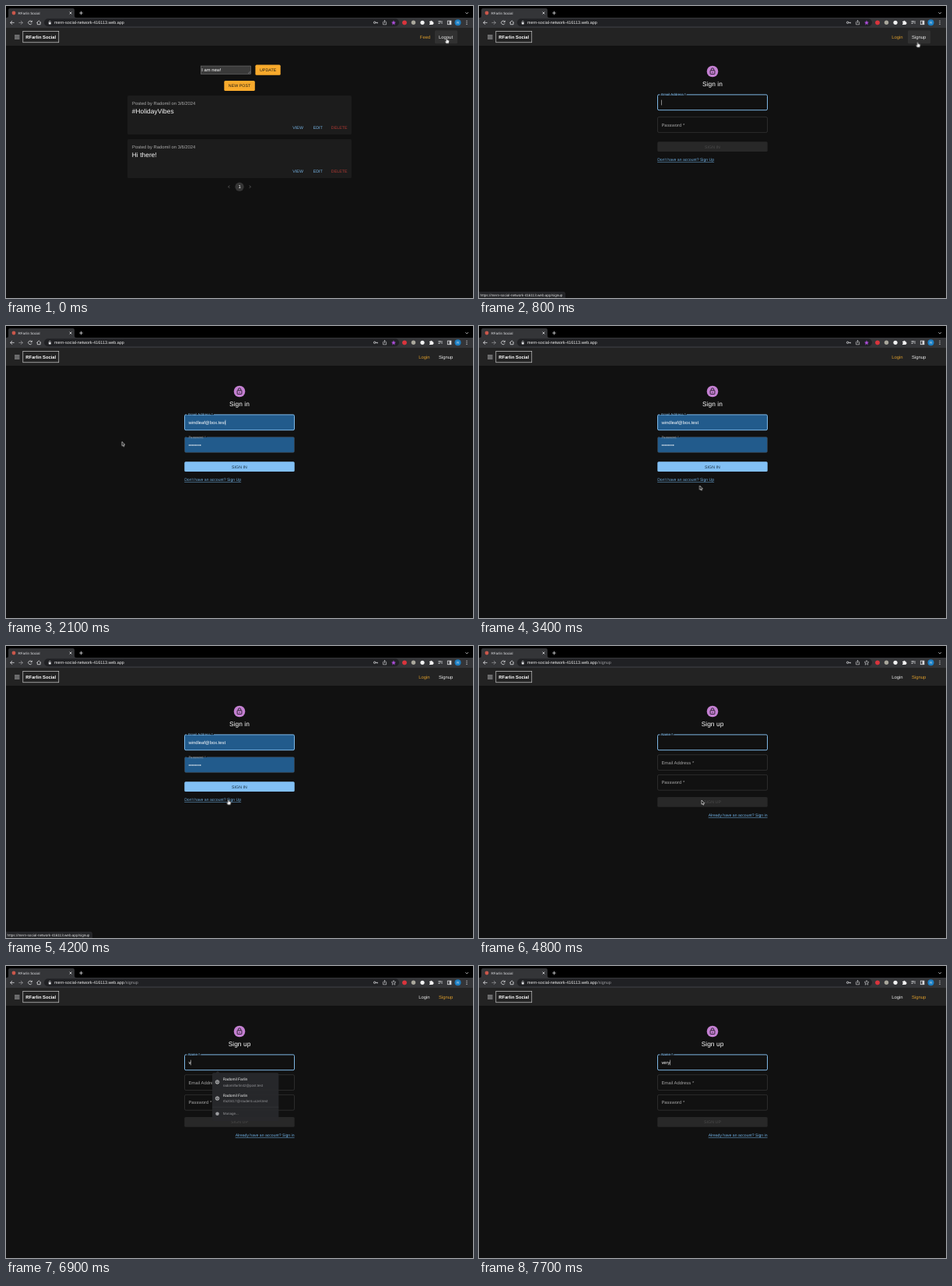
Recreate the animation shown at these times as an HTML page. Size 600 by 375 pixels, loop 8000 ms.

```html
<!DOCTYPE html>
<html lang="en">
<head>
<meta charset="utf-8">
<title>RFarlin Social</title>
<style>
html, body { margin: 0; width: 100%; height: 100%; overflow: hidden; background: #111; }
svg { display: block; width: 100vw; height: 100vh; }
text { font: 5.83px "Liberation Sans", Arial, sans-serif; fill: #fff; text-rendering: geometricPrecision; white-space: pre; }
.mid { text-anchor: middle; }
.end { text-anchor: end; }
.line { fill: none; stroke: #dcdde0; stroke-width: .8; }
.tab { font-size: 4.5px; fill: #e4e5e8; }
.url { font-size: 5.4px; fill: #eee; }
.dim { fill: #9a9b9e; }
.nav { font-size: 5.9px; fill: #e8e8e8; }
.now { fill: #d99a2b; }
.brand { font-weight: bold; }
.h { font-size: 8.33px; letter-spacing: .06px; }
.btn { font-size: 5.25px; letter-spacing: .05px; }
.dark { fill: #1d1a14; }
.off { fill: #4b4b4b; }
.by { fill: #a9a9a9; }
.view { fill: #79b8ea; }
.del { fill: #b53a34; }
.link { font-size: 5.1px; fill: #70b1e4; text-decoration: underline; }
.label { fill: #a6a6a6; letter-spacing: .05px; }
.small { font-size: 4.37px; }
.focus { fill: #7fbdee; }
.box { fill: none; stroke: #474747; stroke-width: .5; }
.active { stroke: #84c0f0; stroke-width: .95; }
.who { font-size: 4.9px; }
.mail { font-size: 4.53px; fill: #9b9ca0; }

.cut { animation: 8s step-end infinite; }
.fade { animation: 8s linear infinite; }
.home { animation-name: home; }
.login { animation-name: login; }
.signup { animation-name: signup; }
.root { animation-name: root; }
.hover { animation-name: hover; }
.status { animation-name: status; }
.fill { animation-name: fill; }
.empty { animation-name: empty; }
.float { animation-name: float; }
.popup { animation-name: popup; }
.blink { animation: blink 1s step-end infinite; }
.b1 { animation-delay: -.36s; }
.b2 { animation-delay: -.71s; }
.before { animation-name: before; }
.after { animation-name: after; }
.caret { animation-name: caret; }
.k1 { animation-name: after; }
.k2 { animation-name: k2; }
.k3 { animation-name: k3; }
.k4 { animation-name: k4; }
.move { animation-name: move; }
.hand { animation-name: hand; }
.arrow { animation-name: arrow; }
.beam { animation-name: beam; }

@keyframes home { 0% { opacity: 1 } 7.5%, 100% { opacity: 0 } }
@keyframes login { 0% { opacity: 0 } 7.5% { opacity: 1 } 53.625%, 100% { opacity: 0 } }
@keyframes signup { 0% { opacity: 0 } 53.625%, 100% { opacity: 1 } }
@keyframes root { 0% { opacity: 1 } 53.625%, 100% { opacity: 0 } }
@keyframes hover { 0%, 12.8% { opacity: 1 } 15.6%, 100% { opacity: 0 } }
@keyframes status {
  0%, 7.8% { opacity: 0 } 8.8%, 13.5% { opacity: 1 } 15.5%, 46.2% { opacity: 0 }
  47.5%, 57.4% { opacity: 1 } 59.8%, 100% { opacity: 0 }
}
@keyframes fill { 0%, 12.5% { opacity: 0 } 13.5%, 100% { opacity: 1 } }
@keyframes empty { 0%, 12.5% { opacity: 1 } 13.5%, 100% { opacity: 0 } }
@keyframes float {
  0%, 12.5% { transform: translate(234.4px, 154.5px) }
  15%, 100% { transform: translate(234.2px, 144px) scale(.75) }
}
@keyframes popup { 0%, 71.8% { opacity: 0 } 73%, 86.2% { opacity: 1 } 87.4%, 100% { opacity: 0 } }
@keyframes blink { 0% { opacity: 1 } 50%, 100% { opacity: 0 } }
@keyframes before { 0% { opacity: 1 } 86.25%, 100% { opacity: 0 } }
@keyframes after { 0% { opacity: 0; fill-opacity: 0 } 86.25%, 100% { opacity: 1; fill-opacity: 1 } }
@keyframes k2 { 0% { fill-opacity: 0 } 91.2%, 100% { fill-opacity: 1 } }
@keyframes k3 { 0% { fill-opacity: 0 } 93.7%, 100% { fill-opacity: 1 } }
@keyframes k4 { 0% { fill-opacity: 0 } 96.2%, 100% { fill-opacity: 1 } }
@keyframes caret {
  0% { transform: translateX(2.9px) } 91.2% { transform: translateX(6.2px) }
  93.7% { transform: translateX(8.2px) } 96.2%, 100% { transform: translateX(11.1px) }
}
@keyframes move {
  0% { transform: translate(566px, 41.5px) }
  4% { transform: translate(565.6px, 42.5px) }
  10% { transform: translate(563.5px, 46.5px) }
  12.8% { transform: translate(560px, 50px) }
  17% { transform: translate(520px, 75px) }
  22.5% { transform: translate(410px, 112px) }
  26.25% { transform: translate(149px, 148.5px) }
  28.5% { transform: translate(141px, 153px) }
  33.75% { transform: translate(212px, 188px) }
  37.5% { transform: translate(268px, 216px) }
  42.5% { transform: translate(283.5px, 205px) }
  46.2% { transform: translate(285px, 198.5px) }
  53.6% { transform: translate(285.6px, 197.2px) }
  60%, 65% { transform: translate(286px, 198px) }
  67.5%, 70% { transform: translate(297px, 132px) }
  73.1%, 100% { transform: translate(298px, 128.3px) }
}
@keyframes hand { 0% { opacity: 1 } 12.8% { opacity: 0 } 45.2% { opacity: 1 } 53.625%, 100% { opacity: 0 } }
@keyframes arrow { 0% { opacity: 0 } 12.8% { opacity: 1 } 45.2% { opacity: 0 } 53.625% { opacity: 1 } 65.6%, 100% { opacity: 0 } }
@keyframes beam { 0% { opacity: 0 } 65.6% { opacity: 1 } 86.25%, 100% { opacity: 0 } }
</style>
</head>
<body>
<svg viewBox="0 0 600 375">
  <defs>
    <g id="card">
      <rect x="156" y="115" width="288" height="50" rx="1.5" fill="#1c1c1c"/>
      <text class="by" x="162" y="127">Posted by Radomil on 3/6/2024</text>
      <text class="btn view" x="368.3" y="157.6">VIEW</text>
      <text class="btn view" x="394.7" y="157.6">EDIT</text>
      <text class="btn del" x="417.8" y="157.6">DELETE</text>
    </g>
    <g id="badge">
      <circle cx="300" cy="84" r="7.3" fill="#c480d2"/>
      <g fill="none" stroke="#1b131d" stroke-width=".85">
        <rect x="297.1" y="82.7" width="5.8" height="4.8" rx=".5"/>
        <path d="M298.3 82.7V81.5a1.7 1.7 0 0 1 3.4 0V82.7"/>
      </g>
      <circle cx="300" cy="85.1" r=".7" fill="#1b131d"/>
    </g>
    <rect id="field" x="229.5" width="141" height="19.8" rx="1.6"/>
    <rect id="button" x="229.3" width="141.4" height="12.8" rx="1.6"/>
    <rect id="bar" x="234.4" y="120.6" width=".5" height="6.8" fill="#fff"/>
    <path id="star" d="M0-3 .8-.9 3-.8 1.3.6 1.9 2.7 0 1.5-1.9 2.7-1.3.6-3-.8-.8-.9Z"/>
    <g id="person" class="line" stroke-width=".5">
      <circle r="2.3"/><circle cy="-.6" r=".75"/><path d="M-1.5 1.6Q0 .2 1.5 1.6"/>
    </g>
  </defs>

  <!-- browser -->
  <rect width="600" height="375" fill="#111"/>
  <rect width="600" height="16" fill="#000"/>
  <path d="M1 15Q3 15 3 13V5Q3 3 5 3H86Q88 3 88 5V13Q88 15 90 15Z" fill="#343538"/>
  <rect y="15" width="600" height="13" fill="#343538"/>
  <rect x="49" y="16.3" width="456" height="10" rx="5" fill="#202124"/>
  <circle cx="10" cy="9" r="2.4" fill="#c9574b"/>
  <text class="tab" x="15.6" y="10.7">RFarlin Social</text>
  <g class="line">
    <path d="M81.6 7.6l2.8 2.8m0-2.8l-2.8 2.8M94.2 9h4.6M96.5 6.7v4.6M590.4 8.2l1.7 1.7 1.7-1.7"/>
    <path d="M10.6 21.4H5.7M8 19l-2.4 2.4L8 23.8"/>
    <path d="M16.4 21.4h4.9M19 19l2.4 2.4-2.4 2.4" opacity=".55"/>
    <path d="M32.9 20.1a2.3 2.3 0 1 0 .2 2.2M33.3 18.7v1.8h-1.8"/>
    <path d="M39.4 21.5l2.8-2.6 2.8 2.6M40.3 21v2.7h3.8V21"/>
    <path d="M55.3 21v-.8a1 1 0 0 1 2 0v.8" stroke-width=".6"/>
    <circle cx="473.6" cy="21.3" r="1.2"/><path d="M474.8 21.3h3M477 21.3v1.2"/>
    <path d="M485.3 20.6h-.9v3.2h4.2v-3.2h-.9M486.5 22.2v-3.8M485.3 19.6l1.2-1.2 1.2 1.2" stroke-width=".6"/>
    <path d="M555.5 19.5h3.4M555.5 21h3.4M555.5 22.5h2M560 19v4" stroke-width=".7"/>
    <rect x="567.3" y="19.1" width="4.6" height="4.6"/>
  </g>
  <rect x="54.8" y="21" width="3" height="2.4" rx=".4" fill="#dcdde0"/>
  <text class="url" x="62" y="23.2">mern-social-network-416113.web.app<tspan class="dim cut k0" id="path"></tspan></text>
  <text class="url dim cut signup" x="152.3" y="23.2" fill="#9a9b9e">/signup</text>
  <use class="cut root" href="#star" x="498" y="21.4" fill="#b14fe0"/>
  <use class="cut signup" href="#star" x="498" y="21.4" fill="none" stroke="#dcdde0" stroke-width=".6"/>
  <circle cx="512" cy="21.3" r="2.9" fill="#d8343c"/>
  <circle cx="523.5" cy="21.3" r="2.7" fill="#a9a79b"/>
  <circle cx="535" cy="21.3" r="2.6" fill="#f1f1f1"/>
  <path d="M544 19.7h1.4a1 1 0 0 1 2 0h1.2v1.4a1 1 0 0 1 0 2v1h-4.6v-1.4a.9.9 0 0 0 0-1.8Z" fill="#f1f1f1"/>
  <path d="M569.6 19.1h2.3v4.6h-2.3Z" fill="#dcdde0"/>
  <circle cx="580.5" cy="21.3" r="4" fill="#1b7fc4"/>
  <text class="tab mid" x="580.5" y="22.9">R</text>
  <g fill="#dcdde0"><circle cx="592" cy="19.2" r=".6"/><circle cx="592" cy="21.3" r=".6"/><circle cx="592" cy="23.4" r=".6"/></g>

  <!-- app bar -->
  <rect y="28" width="600" height="23" fill="#232323"/>
  <path class="line" d="M11 37.8h6.5M11 39.9h6.5M11 42h6.5"/>
  <rect x="21.8" y="32.5" width="46" height="14.3" fill="none" stroke="#e6e6e6" stroke-width=".6"/>
  <text class="brand mid" x="44.8" y="41.8">RFarlin Social</text>
  <rect class="fade hover" x="551" y="31.3" width="29" height="16.9" rx="1.5" fill="#313131"/>

  <g class="cut home">
    <text class="nav now" x="531.8" y="41.8">Feed</text>
    <text class="nav" x="556" y="41.8">Logout</text>
    <rect x="250.3" y="77" width="64.2" height="10.3" fill="#3a3a3a" stroke="#858585" stroke-width=".5"/>
    <path class="line" d="M311.2 86.6l2.6-2.6M312.8 86.6l1-1" style="stroke-width:.35"/>
    <text x="251.2" y="84.1">I am new!</text>
    <rect x="320.4" y="75.6" width="32.3" height="13.2" rx="1.6" fill="#f8aa2c"/>
    <text class="btn dark mid" x="336.6" y="84.1">UPDATE</text>
    <rect x="280.3" y="96" width="39.5" height="13" rx="1.6" fill="#f8aa2c"/>
    <text class="btn dark mid" x="300" y="104.4">NEW POST</text>
    <use href="#card"/>
    <text class="h" x="161.8" y="137.7">#HolidayVibes</text>
    <use href="#card" y="56"/>
    <text class="h" x="161.8" y="193.7">Hi there!</text>
    <circle cx="300" cy="232.2" r="5.6" fill="#363636"/>
    <text class="mid" x="300" y="234.2">1</text>
    <path d="M287.2 230.6l-1.6 1.6 1.6 1.6M312.8 230.6l1.6 1.6-1.6 1.6" fill="none" stroke="#777" stroke-width=".7"/>
  </g>

  <g class="cut login">
    <text class="nav now" x="530.2" y="41.8">Login</text>
    <text class="nav" x="556" y="41.8">Signup</text>
    <use href="#badge"/>
    <text class="h mid" x="300" y="102.6">Sign in</text>
    <g class="fade fill" fill="#225b8c">
      <use href="#field" y="113.9"/><use href="#field" y="142.6"/>
    </g>
    <use class="box active" href="#field" y="113.9"/>
    <use class="box" href="#field" y="142.6"/>
    <path class="fade empty" d="M232 113.9h35" stroke="#111" stroke-width="1.2"/>
    <path class="fade fill" d="M232 113.6h35M232 142.3h26" stroke="#111" stroke-width="1"/>
    <text class="label small focus" x="234.2" y="115.3">Email Address *</text>
    <text class="label fade float">Password *</text>
    <g class="fade fill">
      <text x="234.4" y="126">windleaf@box.test</text>
      <text x="234.4" y="154.6">••••••••</text>
    </g>
    <g class="blink b1">
      <use class="fade empty" href="#bar"/>
      <use class="fade fill" href="#bar" x="47.4"/>
    </g>
    <use href="#button" y="174.2" fill="#282828"/>
    <text class="btn mid off" x="300" y="182.5">SIGN IN</text>
    <g class="fade fill">
      <use href="#button" y="174.2" fill="#82c0f5"/>
      <text class="btn mid" x="300" y="182.5" style="fill:#172c3d">SIGN IN</text>
    </g>
    <text class="link" x="229.2" y="199">Don't have an account? Sign Up</text>
  </g>

  <g class="cut signup">
    <text class="nav" x="530.2" y="41.8">Login</text>
    <text class="nav now" x="556" y="41.8">Signup</text>
    <use href="#badge"/>
    <text class="h mid" x="300" y="102.6">Sign up</text>
    <use class="box active" href="#field" y="113.9"/>
    <use class="box" href="#field" y="139.7"/>
    <use class="box" href="#field" y="165.4"/>
    <path d="M232 113.9h18.5" stroke="#111" stroke-width="1.2"/>
    <text class="label small focus" x="234.2" y="115.3">Name *</text>
    <text class="label" x="234.4" y="151.6">Email Address *</text>
    <text class="label" x="234.4" y="177.3">Password *</text>
    <text x="234.4" y="126"><tspan class="cut k1">v</tspan><tspan class="cut k2">e</tspan><tspan class="cut k3">r</tspan><tspan class="cut k4">y</tspan></text>
    <g class="cut before"><use class="blink b2" href="#bar"/></g>
    <g class="cut after"><g class="cut caret"><use href="#bar"/></g></g>
    <use href="#button" y="194" fill="#282828"/>
    <text class="btn mid off" x="300" y="202.3">SIGN UP</text>
    <text class="link end" x="370.6" y="219">Already have an account? Sign in</text>
  </g>

  <g class="fade popup">
    <path d="M267 137.2H269.5L272 134.8 274.5 137.2H348.5Q350.3 137.2 350.3 139V197Q350.3 199 348.5 199H267Q265 199 265 197V139Q265 137.2 267 137.2Z" fill="#28292c"/>
    <use href="#person" x="271.5" y="149"/>
    <text class="who" x="278.8" y="147">Radomil Farlin</text>
    <text class="mail" x="278.8" y="154.6">radomilfarlin42@post.test</text>
    <use href="#person" x="271.5" y="170"/>
    <text class="who" x="278.8" y="167.8">Radomil Farlin</text>
    <text class="mail" x="278.8" y="175.3">rfa20417@student.uczel.test</text>
    <path d="M265 181.2h85.3" stroke="#3d3e42" stroke-width=".5"/>
    <circle cx="271.5" cy="189.8" r="2.3" fill="#a5a6a9"/>
    <text class="mail" x="278.8" y="191.4">Manage...</text>
  </g>

  <g class="fade status">
    <path d="M0 367.3H108.5Q110.5 367.3 110.5 369.3V375H0Z" fill="#242528" stroke="#3b3c3f" stroke-width=".4"/>
    <text x="1.6" y="372.9" style="font-size:4.64px;fill:#dedede">https://mern-social-network-416113.web.app/signup</text>
  </g>

  <!-- pointer -->
  <g class="fade move" stroke-linejoin="round">
    <path class="cut hand" d="M-.6 0Q.2-.6.6.3L.8 2 3 2.6Q3.6 2.9 3.4 4L2.8 6.4H-.4L-2.2 4Q-2.2 3.2-.6 4Z" fill="#fff" stroke="#111" stroke-width=".4"/>
    <path class="cut arrow" d="M0 0V5.3L1.2 4.3 2 6.2 2.9 5.8 2.1 4H3.8Z" fill="#111" stroke="#fff" stroke-width=".6"/>
    <path class="cut beam" d="M-1.3-3Q0-3 0-2.2Q0-3 1.3-3M0-2.2V2.2M-1.3 3Q0 3 0 2.2Q0 3 1.3 3M-.7.8H.7" fill="none" stroke="#fff" stroke-width=".7"/>
  </g>
</svg>
</body>
</html>
```
